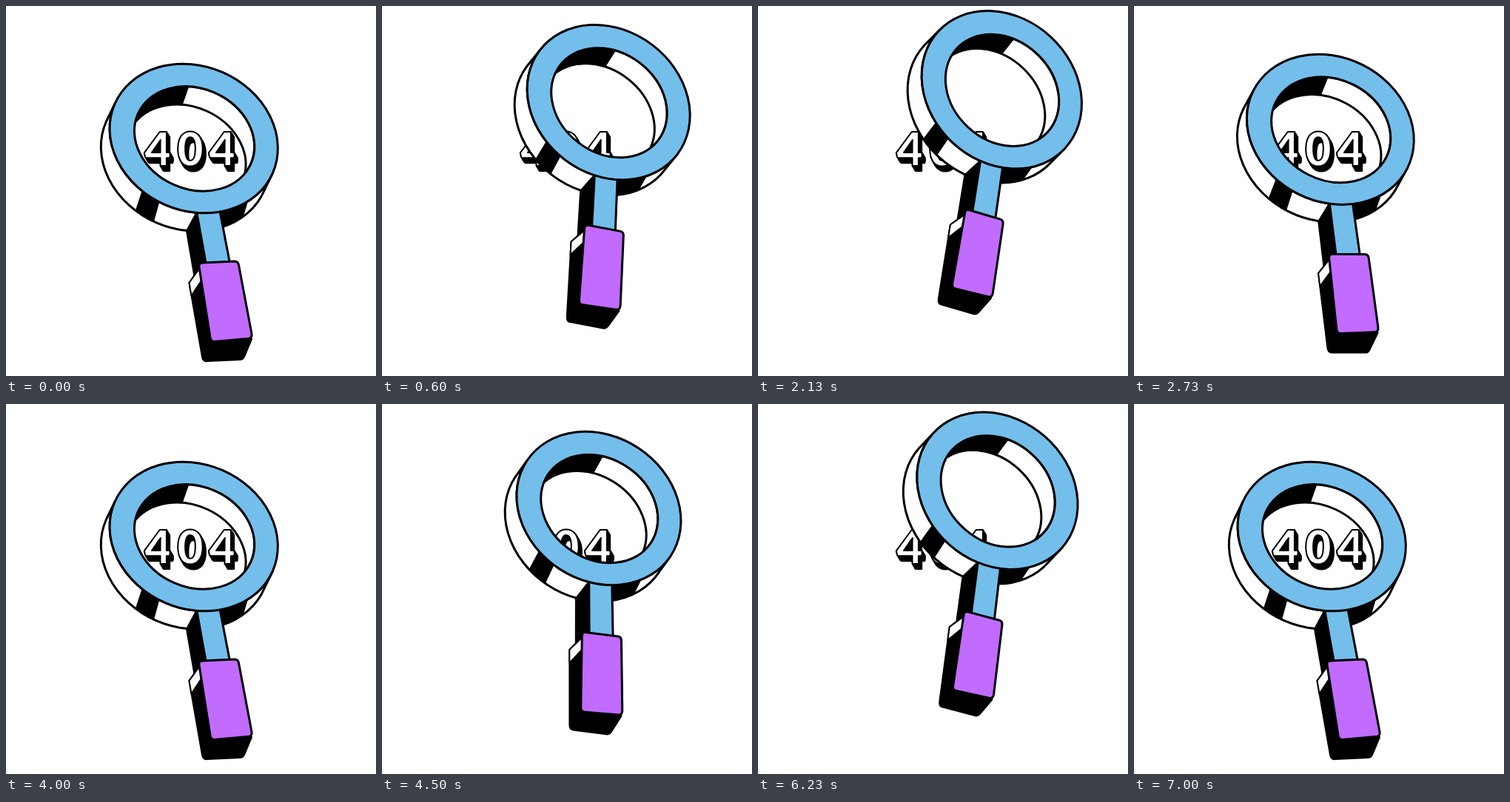
An HTML page that plays this animation: 500 px wide and 500 px high, repeating every 8010 ms.

```html
<!DOCTYPE html>
<html lang="en">
<head>
<meta charset="utf-8">
<title>404</title>
<style>
  html, body { margin: 0; height: 100%; overflow: hidden; background: #fff; }
  svg { display: block; width: 100%; height: 100%; }
  text { font: 900 62px Lato, Inter, sans-serif; text-anchor: middle; }
  #lens { stroke: #000; stroke-width: 3; stroke-linejoin: round; fill: #fff; }
  #lens .blue { fill: #74beeb; }
  #lens .purple { fill: #c16bff; }
  #lens .black { fill: #000; stroke-width: 2; }
</style>
</head>
<body>
<svg viewBox="0 0 500 500">
  <g id="label" stroke="#000" stroke-width="2" stroke-linejoin="round"></g>
  <g id="lens">
    <!-- ring side and inner wall, drawn along the axes of the ellipse -->
    <g transform="translate(253.700 179) rotate(23.7)">
      <path d="M116.500 0L115.500 27A116.500 97.500 0 0 1 -117.500 27L-116.500 0A116.500 97.500 0 0 0 116.500 0Z"/>
      <path class="black" d="M-35 90L-32 121A116.500 97.500 0 0 0 -5 124.500L-10 90Z"/>
      <path class="black" d="M46 86L43 116A116.500 97.500 0 0 0 103 70.500L100 46Z"/>
      <path d="M-81.3 11.5A83.5 68 0 1 1 82.3 15.5A83.5 68 0 0 0 -81.3 11.5Z"/>
      <path class="black" d="M-81.3 11.5A83.5 68 0 0 1 -35 -61.4L-33 -35.5A83.5 68 0 0 0 -81.3 11.5Z"/>
    </g>
    <!-- neck -->
    <path class="black" d="M257 280L244 304L255 368L275 348Z"/>
    <path class="blue" d="M256.500 272L270.500 350H303L288 272Z"/>
    <!-- front of the ring -->
    <path class="blue" fill-rule="evenodd" transform="translate(253.7 179) rotate(23.7)"
      d="M-116.500 0A116.500 97.500 0 0 1 116.500 0A116.500 97.500 0 0 1 -116.500 0ZM-82.5 0A83.5 68 0 0 1 84.5 0A83.5 68 0 0 1 -82.5 0Z"/>
    <!-- grip -->
    <path class="black" d="M264 350L247.500 374L265 474Q266 481 272 480L316 478Q320 478 322 474L332 450Z"/>
    <path stroke-width="2" d="M262 354L247.500 374L250.500 391.500L264 371Z"/>
    <path class="purple" d="M266 347L309 345Q313.500 345 314.500 350L332 443Q333 449 327 449.500L282 453.500Q277 454 276 448L261 353Q260 347 266 347Z"/>
  </g>
</svg>
<script>
  const label = document.getElementById('label');
  const lens = document.getElementById('lens');

  // Extruded digits: black copies stacked below a white face
  const digits = (dx, dy, fill) =>
    [205, 249, 292].map((x, i) =>
      `<text x="${x + dx}" y="${216 + dy}" fill="${fill}">${'404'[i]}</text>`).join('');
  let layers = '';
  for (let i = 7; i > 0; i--) layers += digits(i * 0.6, i, '#000');
  label.innerHTML = layers + digits(0, 0, '#fff');

  // cubic-bezier(.42, 0, .58, 1)
  function ease(x) {
    let lo = 0, hi = 1, s;
    for (let i = 0; i < 20; i++) {
      s = (lo + hi) / 2;
      const bx = 1.26 * s * (1 - s) ** 2 + 1.74 * s * s * (1 - s) + s ** 3;
      if (bx < x) lo = s; else hi = s;
    }
    return s * s * (3 - 2 * s);
  }

  // Rise for 1 s, hold 1 s, return for 1 s, rest 1 s
  function progress(ms) {
    const t = ms % 4000 / 1000;
    if (t < 1) return ease(t);
    if (t < 2) return 1;
    return t < 3 ? 1 - ease(t - 2) : 0;
  }

  const start = performance.now();
  function draw() {
    const p = progress(Math.max(0, performance.now() - start) % 8010);
    lens.setAttribute('transform',
      `translate(${-16 * p} ${-66.5 * p}) rotate(${19.7 * p} 304 450)`);
    requestAnimationFrame(draw);
  }
  draw();
</script>
</body>
</html>
```
